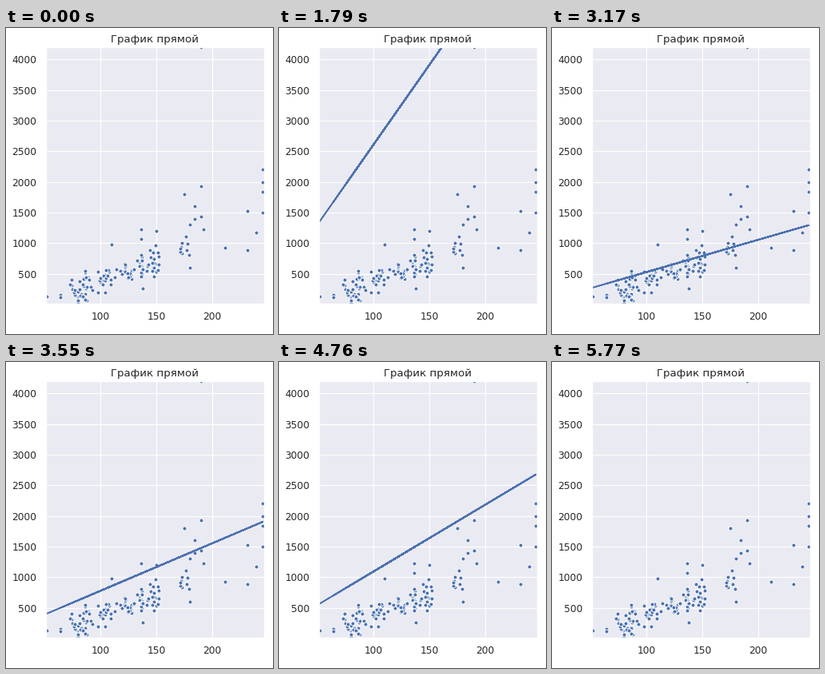
Write a matplotlib script that moves like this. It is 334x383 px and loops after 5.82 s.

```python
import numpy as np
import matplotlib.pyplot as plt
from matplotlib.animation import FuncAnimation

W, H, DPI = 334, 383, 80
LOOP, STEP, BEAT = 5820, 20, 195
BLUE, INK, PANEL = "#4c72b0", "#262626", "#eaeaf2"
plt.rcParams["font.family"] = "DejaVu Sans"
# keep every retraced segment, which gives the line its hard edges
plt.rcParams["path.simplify"] = False

# points that stand apart from the cloud
OUTLIERS = [
    (52, 125), (64, 150), (64, 115), (110, 975), (136, 1230), (136, 1075),
    (150, 1195), (175, 1795), (180, 1300), (180, 605), (184, 1600),
    (184, 1390), (190, 4194), (190, 1930), (190, 1440), (192, 1225),
    (211.5, 920), (231, 1520), (231, 880), (239, 1180),
    (245, 2200), (245, 1995), (245, 1845), (245, 1500),
]

# key times in ms and slopes; a zero slope lies below the view
KEYS = [
    (0, 0), (410, 33.6), (590, 0), (950, 13.95), (1180, 0), (1560, 17),
    (2350, 53.3), (2580, 9.16), (2710, 1.4), (2990, 3.6), (3170, 5.28),
    (3370, 7.77), (4110, 4.46), (4760, 10.92), (4940, 0.95),
    (5170, 6.33), (5770, 0), (LOOP, 0),
]


def make_points():
    """Outliers plus clusters of integer x values around a rising trend."""
    rng = np.random.default_rng(4)
    points = list(OUTLIERS)
    for center, spread in zip((79, 87, 104, 122, 136, 147, 172),
                              (3, 3, 4, 3.5, 1, 3, 6)):
        count = 20 if center < 160 else 9
        x = np.round(rng.normal(center, spread, count))
        y = 6.4 * x - 260 + rng.normal(0, 125, count)
        points += zip(x, np.maximum(y, 30))
    return rng.permutation(np.array(points, float)).T


def slope_at(ms):
    """Jump from key to key in equal steps of about one beat."""
    for (t0, a), (t1, b) in zip(KEYS, KEYS[1:]):
        if t0 <= ms < t1:
            steps = max(1, round((t1 - t0) / BEAT))
            done = int((ms - t0) / (t1 - t0) * steps) / steps
            return a + (b - a) * done if a else 0


def make_axes(fig):
    left, right, top, bottom = 49.55, 322.5, 24.4, 344.8
    ax = fig.add_axes([left / W, 1 - bottom / H,
                       (right - left) / W, (bottom - top) / H])
    ax.set(xlim=(51, 246), ylim=(15, 4195), facecolor=PANEL,
           xticks=range(100, 201, 50), yticks=range(500, 4001, 500))
    ax.set_axisbelow(True)
    ax.grid(color="white", linewidth=1)
    ax.tick_params(length=0, pad=9.5, labelsize=11, labelcolor=INK)
    ax.tick_params(axis="y", pad=10)
    for spine in ax.spines.values():
        spine.set(color="white", linewidth=1.25)
    ax.set_title("График прямой", fontsize=12, color=INK, pad=6)
    return ax


fig = plt.figure(figsize=(W / DPI, H / DPI), dpi=DPI, facecolor="white")
ax = make_axes(fig)
xs, ys = make_points()
ax.scatter(xs, ys, s=20, color=BLUE, edgecolors="white", linewidths=0.8)
line, = ax.plot(xs, 0 * xs, color=BLUE, linewidth=1.5,
                solid_capstyle="round")


def update(i):
    line.set_ydata(slope_at((i + 0.5) * STEP) * xs)
    return line,


anim = FuncAnimation(fig, update, frames=LOOP // STEP, interval=STEP,
                     repeat=True, repeat_delay=0)
plt.show()
```
